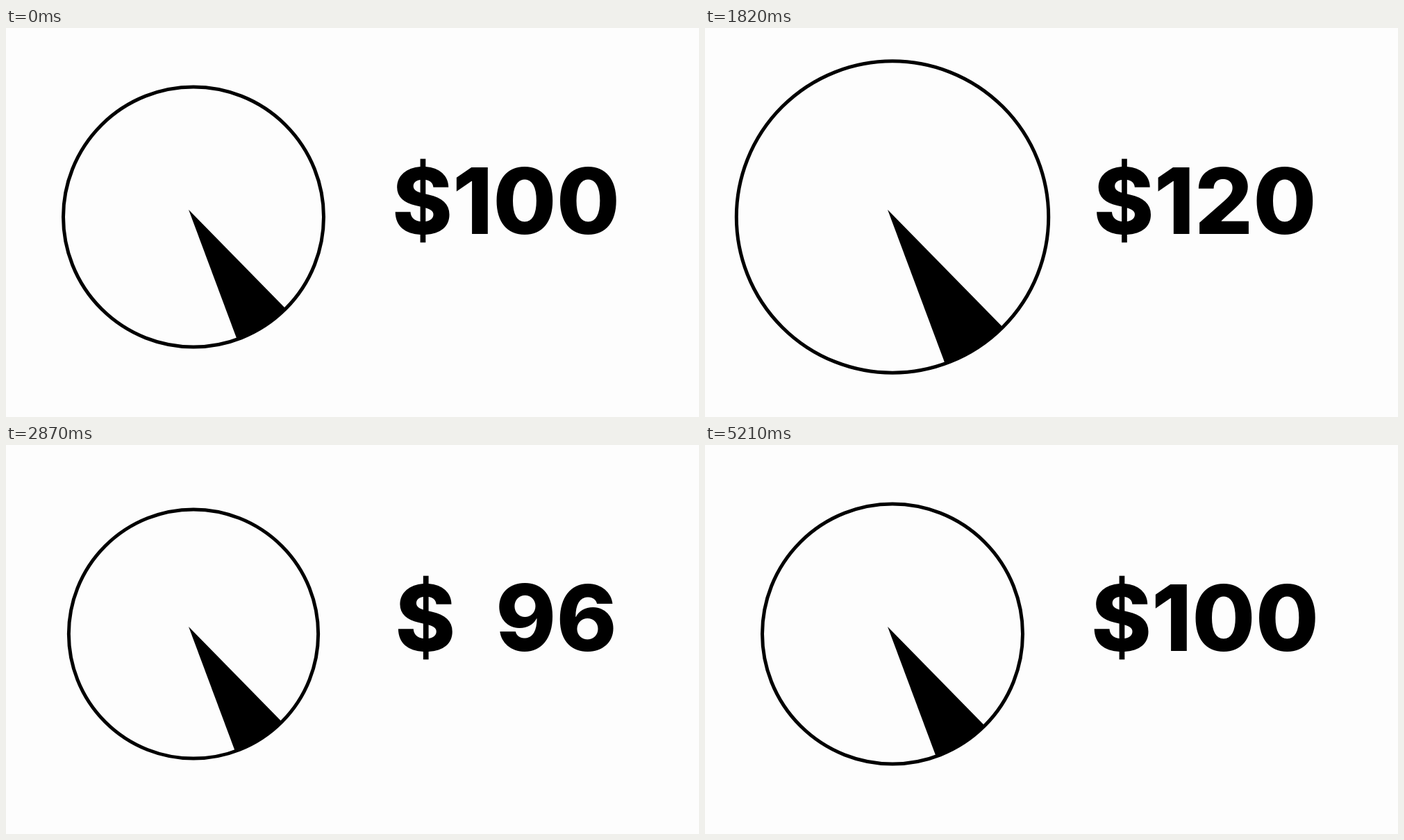
Write an HTML page with a canvas that moves like this. It is 998 px wide and 561 px high and loops after 5.24 s.

```html
<!DOCTYPE html>
<html lang="en">
<head>
<meta charset="utf-8">
<title>Pie value</title>
<style>
  html, body { margin: 0; width: 100%; height: 100%; overflow: hidden; background: #fdfdfd; }
  canvas { display: block; }
</style>
</head>
<body>
<canvas id="stage" width="998" height="561"></canvas>
<script>
const ctx = document.getElementById('stage').getContext('2d');
const LOOP = 5240, PEAK = 1747, LOW = 3750;
const CX = 270, CY = 272.5, LINE = 5;
const TIP = [263, 262];

// Falling part: [time, value]
const fall = [
  [PEAK, 120], [1880, 119.7], [2110, 111.3], [2410, 101.8], [2670, 98.6],
  [2870, 95.8], [3230, 91.5], [3500, 90.2], [LOW, 90]
];

// Slow start, quick middle, long settle
function ease(x) {
  let lo = 0, hi = 1;
  for (let i = 0; i < 24; i++) {
    const s = (lo + hi) / 2, r = 1 - s;
    if (3 * s * r * r * 0.584 + 3 * s * s * r * 0.165 + s ** 3 < x) lo = s;
    else hi = s;
  }
  return lo * lo * (3 - 2 * lo);
}

const slope = (p, i) => (p[i + 1][1] - p[i][1]) / (p[i + 1][0] - p[i][0]);

function tangent(p, i) {
  if (i === 0 || i === p.length - 1) return 0;
  const a = slope(p, i - 1), b = slope(p, i);
  return a * b > 0 ? 2 * a * b / (a + b) : 0;
}

// Monotone cubic through the points
function spline(p, t) {
  let i = 0;
  while (i < p.length - 2 && t > p[i + 1][0]) i++;
  const h = p[i + 1][0] - p[i][0], u = (t - p[i][0]) / h, w = 1 - u;
  return p[i][1] * (1 + 2 * u) * w * w + p[i + 1][1] * u * u * (3 - 2 * u)
    + h * u * w * (w * tangent(p, i) - u * tangent(p, i + 1));
}

function valueAt(t) {
  if (t < PEAK) return 100 + 20 * ease(t / PEAK);
  if (t < LOW) return spline(fall, t);
  return 90 + 10 * ease((t - LOW) / (LOOP - LOW));
}

function circle(r) {
  ctx.beginPath();
  ctx.arc(CX, CY, r, 0, 2 * Math.PI);
}

function draw(t) {
  const value = valueAt(t), shown = Math.round(value);
  const r = 190 + 1.87 * (value - 100) - LINE / 2;

  ctx.fillStyle = '#fdfdfd';
  ctx.fillRect(0, 0, 998, 561);
  ctx.fillStyle = ctx.strokeStyle = '#000';

  ctx.save();
  circle(r);
  ctx.clip();
  ctx.beginPath();
  ctx.moveTo(...TIP);
  ctx.lineTo(TIP[0] + 139 * 2, TIP[1] + 142 * 2);
  ctx.lineTo(TIP[0] + 69.3 * 2, TIP[1] + 186 * 2);
  ctx.fill();
  ctx.restore();

  circle(r);
  ctx.lineWidth = LINE;
  ctx.stroke();

  ctx.font = '800 132px Inter, sans-serif';
  ctx.textAlign = 'center';
  ctx.fillText('$' + (shown < 100 ? '  ' : '') + shown, 720, 297);
}

function frame() {
  draw(performance.now() % LOOP);
  requestAnimationFrame(frame);
}
frame();
</script>
</body>
</html>
```
